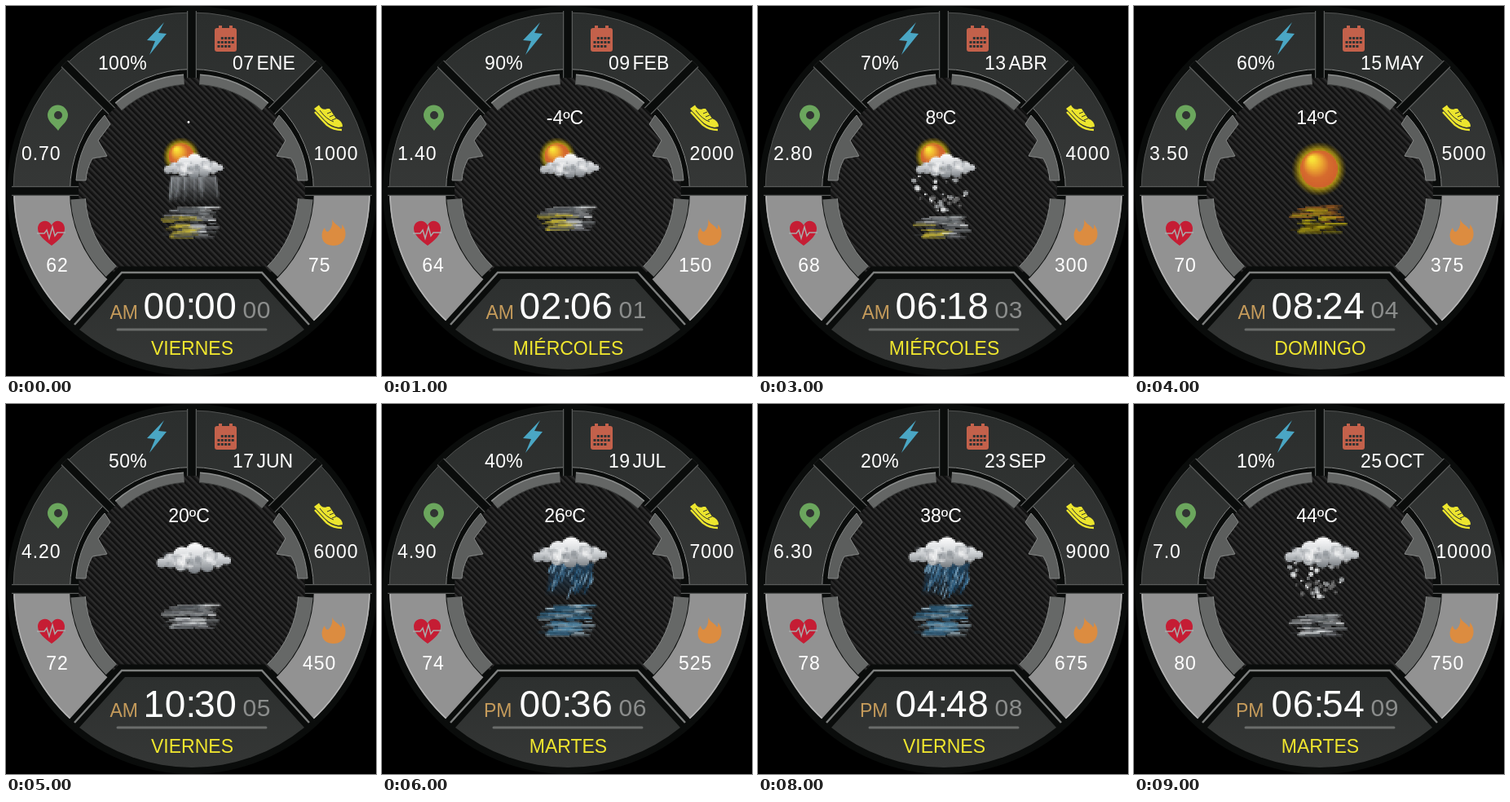
These frames come from a looping animation (454 px wide and 454 px high, 10 s). An HTML page with a canvas:

```html
<!DOCTYPE html>
<html lang="es">
<head>
<meta charset="utf-8">
<title>Esfera</title>
<style>
  html, body { margin: 0; width: 100%; height: 100%; overflow: hidden; background: #000; }
  canvas { display: block; width: 454px; height: 454px; }
</style>
</head>
<body>
<canvas id="stage" width="454" height="454"></canvas>
<script>
const SIZE = 454, CX = 228, CY = 227, R = 219, TAU = Math.PI * 2, DEG = Math.PI / 180;
const FONT = '"Liberation Sans", Arial, sans-serif';
const DARK = '#0a0c0b', PANEL = '#303332';
const MONTHS = 'ENE FEB MAR ABR MAY JUN JUL AGO SEP OCT'.split(' ');
const DAYS = 'VIERNES MIÉRCOLES VIERNES MIÉRCOLES DOMINGO VIERNES MARTES DOMINGO VIERNES MARTES'.split(' ');
const SKIES = [
  { sun: 1, fall: 'mist' }, { sun: 1 }, { sun: 1, fall: 'rain' }, { sun: 1, fall: 'snow' }, { clear: 1 },
  {}, { fall: 'rain', drops: 45 }, { fall: 'snow', drops: 25 }, { fall: 'rain', drops: 70 }, { fall: 'snow', drops: 48 }
];

const stage = document.getElementById('stage').getContext('2d');
const layer = () => {
  const canvas = document.createElement('canvas');
  canvas.width = canvas.height = SIZE;
  return canvas.getContext('2d');
};
const face = layer(), sky = layer();

function random(seed) {
  return () => {
    seed = (seed * 16807) % 2147483647;
    return seed / 2147483647;
  };
}
const pad = n => String(n).padStart(2, '0');

function fill(c, path, color) {
  c.fillStyle = color;
  c.fill(new Path2D(path), 'evenodd');
}
function stroke(c, path, color, width = 1) {
  c.strokeStyle = color;
  c.lineWidth = width;
  c.stroke(new Path2D(path));
}
function disc(c, x, y, r, color) {
  c.fillStyle = color;
  c.beginPath();
  c.arc(x, y, r, 0, TAU);
  c.fill();
}
function gradient(c, y0, y1, ...colors) {
  const g = c.createLinearGradient(0, y0, 0, y1);
  colors.forEach((color, i) => g.addColorStop(i / (colors.length - 1), color));
  return g;
}
function band(c, from, to, inner, outer, color) {
  c.beginPath();
  c.arc(CX, CY, outer, from * DEG, to * DEG);
  c.arc(CX, CY, inner, to * DEG, from * DEG, true);
  c.closePath();
  c.fillStyle = color;
  c.fill();
}
function arcLine(c, from, to, r, color, width = 1) {
  c.beginPath();
  c.arc(CX, CY, r, from * DEG, to * DEG);
  c.strokeStyle = color;
  c.lineWidth = width;
  c.stroke();
}
function spoke(c, angle) {
  const [cos, sin] = [Math.cos(angle * DEG), Math.sin(angle * DEG)];
  const line = `M${CX + 128 * cos} ${CY + 128 * sin}L${CX + 221 * cos} ${CY + 221 * sin}`;
  stroke(c, line, '#5a5c5b', 12);
  stroke(c, line, DARK, 9.5);
}
function mirrored(c, draw) {
  draw();
  c.save();
  c.translate(2 * CX, 0);
  c.scale(-1, 1);
  draw();
  c.restore();
}

function drawCarbon(c) {
  c.save();
  c.beginPath();
  c.arc(CX, CY, 139, 0, TAU);
  c.clip();
  c.fillStyle = '#171717';
  c.fillRect(80, 80, 300, 300);
  for (let x = -304; x < 300; x += 8) {
    stroke(c, `M${80 + x} 80l300 300`, '#2b2b2b', 2.6);
    stroke(c, `M${83 + x} 80l300 300`, '#0e0e0e', 1.2);
  }
  c.restore();
}

function drawFace(c) {
  disc(c, CX, CY, 227, DARK);
  band(c, 180, 360, 150, R, gradient(c, 8, 222, '#2b2e2d', '#353736'));
  band(c, 0, 180, 150, R, '#929292');
  arcLine(c, 180, 360, R, '#505251');
  arcLine(c, 0, 180, R - 1, '#b4b4b4', 1.5);
  arcLine(c, 180, 360, 149.5, '#8a8c8b');
  [180, 225, 270, 315, 360].forEach(a => spoke(c, a));
  drawCarbon(c);

  mirrored(c, () => {
    band(c, 229, 266, 131, 143, '#646665');
    arcLine(c, 229, 266, 143, '#8d8f8e', 1.5);
    arcLine(c, 229, 266, 131, '#3c3e3d');
    const wing = 'M121 134L128 145L113 165L124 184L106 187Q99 199 98 214L86 214Q89 169 121 134Z';
    fill(c, wing, '#5c5e5d');
    stroke(c, wing, '#858786');
    band(c, 135, 176, 131, 149, '#666867');
    arcLine(c, 135, 176, 131, '#858786');
  });

  const base = 'M142 327H314L372 391A219 219 0 0 1 84 391Z';
  stroke(c, base, DARK, 15);
  fill(c, base, DARK);
  stroke(c, 'M84 391L142 327H314L372 391', '#7d7f7e', 2.5);
  fill(c, 'M146 335H310L366 397A219 219 0 0 1 90 397Z', gradient(c, 335, 446, '#2d302f', '#353736'));
  c.lineCap = 'round';
  stroke(c, 'M137 397H319', '#6a6c6b', 3);
  c.lineCap = 'butt';
  drawIcons(c);
}

function drawIcons(c) {
  // battery and calendar
  fill(c, 'M194 20L173 42L183 43L176 60L197 34L187 33Z', '#4aa6c4');
  c.fillStyle = '#c3614b';
  c.beginPath();
  c.roundRect(256, 27, 27, 29, 3);
  c.fill();
  c.fillRect(261, 24, 4, 5);
  c.fillRect(274, 24, 4, 5);
  c.fillStyle = PANEL;
  for (let i = 1; i < 14; i++) c.fillRect(259.5 + i % 5 * 4.3, 38 + Math.floor(i / 5) * 5, 3, 3);

  // location and shoe
  fill(c, 'M64 153C59 146 51 142 51 134A12.5 12.5 0 0 1 76 134C76 142 68 146 64 153ZM59 134a5 5 0 1 0 10 0a5 5 0 1 0-10 0Z', '#6ba65d');
  fill(c, 'M378 126L384 121.5Q388 129 394 126L397 126L405 138Q413 141 413 148L408 149Q399 148 391 140Z', '#ece52e');
  stroke(c, 'M379 130Q387 139 394 146Q402 152 412 152', '#ece52e', 2.5);
  stroke(c, 'M394 132l5-2M397 136l5-2M400 140l5-2M385 128Q393 139 402 142', PANEL, 1);

  // heart and flame
  fill(c, 'M56 294C47 287 39 281 39 273C39 263 51 260 56 269C60 260 72 263 72 273C72 281 65 287 56 294Z', '#c51d34');
  stroke(c, 'M38 279H47L50 275L53 285L57 271L60 282L63 278H73', '#aaa', 1.5);
  fill(c, 'M400 261C401 267 409 269 411 274Q413 272 412 268C420 276 418 294 402 294C386 294 385 279 391 272Q392 277 395 277C400 273 401 267 400 261Z', '#dc8c40');
}

function drawSun(c, x, y, r) {
  const glow = c.createRadialGradient(x, y, r * .7, x, y, r * 1.35);
  glow.addColorStop(0, 'rgba(245,220,20,1)');
  glow.addColorStop(.5, 'rgba(215,185,15,.6)');
  glow.addColorStop(1, 'rgba(150,120,0,0)');
  disc(c, x, y, r * 1.35, glow);
  const body = c.createRadialGradient(x - r * .35, y - r * .5, r * .1, x, y, r);
  body.addColorStop(0, '#f8e338');
  body.addColorStop(.25, '#f0b431');
  body.addColorStop(.6, '#d66c2e');
  body.addColorStop(1, '#cf5e2c');
  disc(c, x, y, r * .92, body);
}

function drawCloud(c, x, y, k) {
  const puffs = [[-38, 5, 6], [-27, 2, 9], [-13, -4, 11], [3, -8, 12], [17, -3, 11], [31, 1, 9], [42, 2, 5],
                 [-14, 7, 8], [2, 9, 9], [18, 8, 8]];
  const shade = gradient(c, y - 20 * k, y + 18 * k, '#fff', '#d2d5d8', '#74797e');
  puffs.forEach(([dx, dy, r]) => disc(c, x + dx * k, y + dy * k, r * k, shade));
  const rnd = random(31);
  for (let i = 0; i < 26; i++) {
    const tone = i % 2 ? 'rgba(255,255,255,.4)' : 'rgba(105,112,120,.3)';
    disc(c, x + (rnd() * 66 - 33) * k, y + (rnd() * 18 - 6) * k, (2 + rnd() * 4) * k, tone);
  }
}

function drawFall(c, kind, drops, top) {
  const rnd = random(77);
  if (kind === 'mist') {
    fill(c, `M203 ${top}H258L264 ${top + 34}H198Z`, gradient(c, top, top + 34, 'rgba(170,175,180,.55)', 'rgba(120,125,130,0)'));
    for (let i = 0; i < 30; i++) {
      const x = 203 + rnd() * 54;
      stroke(c, `M${x} ${top}l${(x - 229) * .12} ${14 + rnd() * 18}`, 'rgba(190,195,200,.15)', 2.5);
    }
  } else if (kind === 'rain') {
    fill(c, `M208 ${top}H260L252 ${top + 40}H200Z`, gradient(c, top, top + 40, 'rgba(45,95,135,.6)', 'rgba(25,60,90,.1)'));
    for (let i = 0; i < drops; i++) {
      const x = 207 + rnd() * 52, y = top + rnd() * 30, length = 6 + rnd() * 9;
      stroke(c, `M${x} ${y}l${-length * .35} ${length}`, ['#3f7399', '#7ba6c2', '#1d4665'][i % 3], 1.5);
    }
  } else {
    for (let i = 0; i < drops; i++) {
      const depth = rnd(), x = 226 + (rnd() - .5) * (76 - depth * 34);
      disc(c, x, top + depth * 42, 1.3 + rnd() * 2, ['#d8dadb', '#999c9e', '#666'][i % 3]);
    }
  }
}

function drawReflection(c, colors, top, bottom, amount) {
  const rnd = random(4711);
  for (let i = 0; i < 10; i++) rnd();
  for (let i = 0; i < amount; i++) {
    const depth = rnd(), x = 227 + (rnd() + rnd() - 1) * 32;
    const y = top + depth * (bottom - top), w = 4 + rnd() * 11;
    c.globalAlpha = .4 + rnd() * .5;
    stroke(c, `M${x - w} ${y}H${x + w}`, colors(x, depth, rnd()), 1.2 + rnd() * 1.8);
  }
  c.globalAlpha = 1;
}

function drawSky(c, { sun, clear, fall, drops = 38 }) {
  c.setTransform(1, 0, 0, 1, 0, 0);
  c.clearRect(0, 0, SIZE, SIZE);
  c.scale(.5, .5);
  const choose = (pick, ...tones) => tones[Math.floor(pick * tones.length)];
  if (clear) {
    drawSun(c, 227, 200, 25);
    drawReflection(c, (x, d, p) => d < .6 ? choose(p, '#a66a25', '#8a4f1e', '#b5a514') : choose(p, '#b5a514', '#514207'), 245, 278, 65);
    return;
  }
  const rain = fall === 'rain', snow = fall === 'snow';
  if (sun) drawSun(c, 215, 184, 17);
  const y = sun ? 197 : fall ? 183 : 190;
  if (fall) drawFall(c, fall, drops, y + 12);
  drawCloud(c, 229, y, sun ? .8 : 1);
  const tones = (x, d, p) => sun && x < 230 && d > .3 && p < .6 ? '#cdbb38'
    : rain ? choose(p, '#4d86a8', '#a3bcc9', '#28536f')
    : choose(p, '#d0d3d5', '#85898d', '#4a4e52');
  drawReflection(c, tones, snow ? 258 : 246, fall ? 284 : 275, snow ? 65 : 100);
}

function text(value, x, y, { size = 23, color = '#fff', align = 'left', gap = 0 } = {}) {
  stage.font = `${size}px ${FONT}`;
  stage.letterSpacing = gap + 'px';
  stage.textAlign = align;
  stage.fillStyle = color;
  stage.fillText(value, x, y);
}

function drawStep(i) {
  stage.fillStyle = '#000';
  stage.fillRect(0, 0, SIZE, SIZE);
  stage.drawImage(face.canvas, 0, 0);
  drawSky(sky, SKIES[i]);
  stage.imageSmoothingEnabled = false;
  stage.drawImage(sky.canvas, 0, 0, SIZE * 2, SIZE * 2);

  const minutes = i * 126, digits = { gap: .9 }, centered = { gap: 1, align: 'center' };
  text(100 - i * 10 + '%', 173, 78, { align: 'right', gap: .3 });
  text(pad(7 + i * 2), 278, 78, { gap: .5 });
  text(MONTHS[i], 307.5, 78);
  if (i === 9) text('7.0', 23, 189, digits);
  else text((.7 * (i + 1)).toFixed(2), 19, 189, digits);
  text(1000 * (i + 1), 405, 189, centered);
  text(62 + i * 2, 63, 326, centered);
  text(75 * (i + 1), 384.7, 326, centered);

  if (i) text(i * 6 - 10 + 'ºC', 224.5, 145, { align: 'center' });
  else disc(stage, 224, 142.5, 1.4, '#fff');

  const big = { size: 46, gap: .6 };
  text(pad(Math.floor(minutes / 60) % 12), 168.5, 384, big);
  text(':', 220.5, 384, big);
  text(pad(minutes % 60), 231, 384, big);
  text(pad(i), 290.5, 383, { size: 30, color: '#8b8d8c', gap: .6 });
  const evening = minutes >= 720;
  text(evening ? 'PM' : 'AM', evening ? 125 : 127.5, 384, { color: '#c59b5b' });
  text(DAYS[i], 228.5, 428, { color: '#f0e62e', align: 'center' });
}

drawFace(face);
let shown = -1;
function tick() {
  const step = Math.floor(performance.now() / 1000) % 10;
  if (step !== shown) drawStep(shown = step);
  requestAnimationFrame(tick);
}
tick();
</script>
</body>
</html>
```
